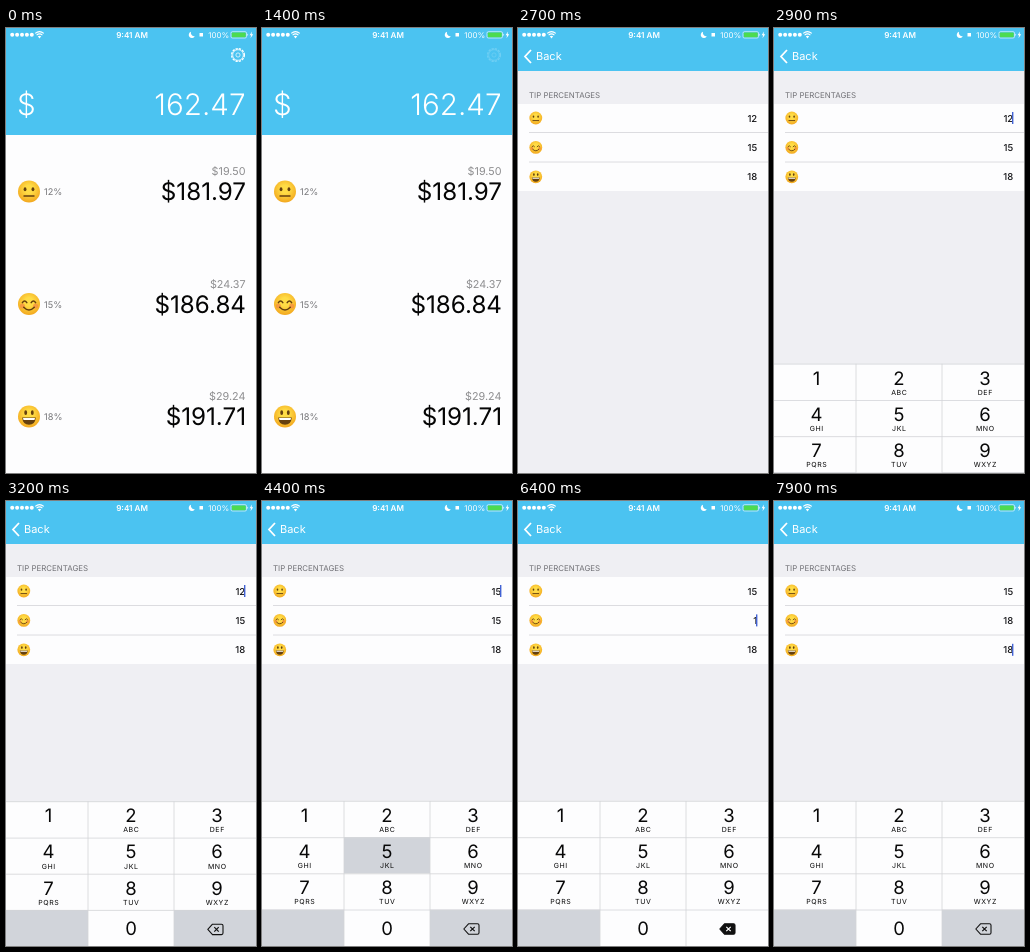
An HTML page for the animation above (8000 ms loop, 250 by 445 pixels).

```html
<!DOCTYPE html>
<html lang="en">
<head>
<meta charset="utf-8">
<title>Tip calculator</title>
<style>
  html, body { margin: 0; width: 100%; height: 100%; overflow: hidden; background: #fdfdfe; }
  svg { display: block; width: 100vw; height: 100vh; }
  text { font-family: Inter, "Open Sans", sans-serif; text-rendering: geometricPrecision; }
  .end { text-anchor: end; }
  .mid { text-anchor: middle; }
  .bill { font-size: 29.6px; font-weight: 300; fill: #fff; }
  .total { font-size: 24.2px; fill: #050505; }
  .tip { font-size: 10.8px; fill: #8e8e90; }
  .rate { font-size: 9.2px; fill: #77777a; }
  .value { font-size: 9.5px; font-weight: 500; fill: #151518; }
  .digit { font-size: 18.5px; fill: #080808; }
  .letters { font-size: 7px; letter-spacing: .6px; fill: #080808; }
</style>
</head>
<body>
<svg viewBox="0 0 250 445" preserveAspectRatio="none">
  <defs>
    <radialGradient id="skin" cx=".5" cy=".4" r=".62">
      <stop offset=".3" stop-color="#ffdc45"/>
      <stop offset="1" stop-color="#f2a51d"/>
    </radialGradient>
    <g id="face0">
      <circle r="10" fill="url(#skin)"/>
      <g fill="#65400f"><ellipse cx="-3.6" cy="-2" rx="1.3" ry="1.8"/><ellipse cx="3.6" cy="-2" rx="1.3" ry="1.8"/></g>
      <path d="M-4.5 4H4.5" stroke="#65400f" stroke-width="1.4" stroke-linecap="round"/>
    </g>
    <g id="face1">
      <circle r="10" fill="url(#skin)"/>
      <g fill="#f58a45" opacity=".7"><circle cx="-6" cy="1.8" r="2.3"/><circle cx="6" cy="1.8" r="2.3"/></g>
      <path d="M-6-1.2Q-4-4.4-2-1.2M2-1.2Q4-4.4 6-1.2M-4.8 3Q0 8 4.8 3" fill="none" stroke="#65400f" stroke-width="1.4" stroke-linecap="round"/>
    </g>
    <g id="face2">
      <circle r="10" fill="url(#skin)"/>
      <g fill="#65400f"><ellipse cx="-3" cy="-3.5" rx="1.3" ry="2.1"/><ellipse cx="3" cy="-3.5" rx="1.3" ry="2.1"/><path d="M-6.2 1H6.2Q5.6 7.6 0 7.6T-6.2 1"/></g>
      <path d="M-5.5 1.3H5.5L5 3.2H-5Z" fill="#fff"/>
    </g>
  </defs>

  <g id="home">
    <rect width="250" height="445" fill="#fdfdfe"/>
    <rect width="250" height="107" fill="#4bc3f1"/>
    <text class="bill" x="11" y="87">$</text>
    <text class="bill end" x="239.5" y="87">162.47</text>
    <g id="totals"></g>
    <rect id="dim" width="250" height="445"/>
  </g>

  <g id="settings">
    <rect width="250" height="445" fill="#efeff3"/>
    <text x="11" y="70" font-size="7.9" fill="#707075">TIP PERCENTAGES</text>
    <rect y="76" width="250" height="87" fill="#fdfdfe"/>
    <path d="M11 104.5H250M11 134H250" stroke="#dcdce0"/>
    <g id="fields"></g>
    <rect id="caret" x="238" width="1.4" height="12" fill="#4262d4"/>
  </g>

  <g id="keypad"></g>

  <g id="navbar">
    <rect width="250" height="43" fill="#4bc3f1"/>
    <g id="gear" fill="none" stroke="#fff" transform="translate(232 27)">
      <circle r="6.3" stroke-width="1.5" stroke-dasharray="2.3 1"/>
      <circle r="5.3" stroke-width=".7"/>
      <circle r="2.1" stroke-width=".7"/>
    </g>
    <g id="return">
      <path d="M13 22L7 28.5L13 35" fill="none" stroke="#fff" stroke-width="1.8"/>
      <text x="18" y="32" font-size="11" fill="#fff">Back</text>
    </g>
  </g>

  <g fill="#fff">
    <g id="signal"></g>
    <path d="M33.5 10.5L31.8 8.3Q33.5 7 35.2 8.3Z"/>
    <path d="M30.6 7.1Q33.5 4.7 36.4 7.1M29.2 5.4Q33.5 1.8 37.8 5.4" fill="none" stroke="#fff" stroke-width="1.1"/>
    <text class="mid" x="126" y="9.8" font-size="8.1" font-weight="600">9:41 AM</text>
    <path d="M185 3.8A3.2 3.2 0 1 0 188.8 8.3A3.5 3.5 0 0 1 185 3.8Z"/>
    <rect x="193.5" y="5" width="3.5" height="3.5"/>
    <text x="202.3" y="9.8" font-size="7.9">100%</text>
    <rect x="225" y="3.7" width="15.5" height="6.3" rx="1.4" fill="none" stroke="#fff" stroke-width=".6"/>
    <rect x="225.8" y="4.5" width="13.9" height="4.7" rx=".8" fill="#4cdb50"/>
    <path d="M241.4 5.5Q243 6.8 241.4 8.1Z"/>
    <path d="M246 3.5L243.6 7.2H245.1L244.5 10.3L247.2 6.3H245.6Z"/>
  </g>
</svg>

<script>
const $ = id => document.getElementById(id);
const set = (id, name, value) => $(id).setAttribute(name, value);
const clamp = v => Math.max(0, Math.min(1, v));
const ramp = (t, from, to) => clamp((t - from) / (to - from));
const face = (i, x, y, r) => `<use href="#face${i}" transform="translate(${x} ${y}) scale(${r / 10})"/>`;

// Critically damped spring from 0 to 1
function spring(t, start, rate) {
  const k = Math.max(0, t - start) / 1000 * rate;
  return 1 - (1 + k) * Math.exp(-k);
}

$('signal').innerHTML = [0, 1, 2, 3, 4].map(i => `<circle cx="${6.2 + i * 4.9}" cy="6.8" r="2"/>`).join('');

$('totals').innerHTML = [
  ['12%', '$19.50', '$181.97'],
  ['15%', '$24.37', '$186.84'],
  ['18%', '$29.24', '$191.71']
].map(([rate, tip, total], i) => `<g transform="translate(0 ${i * 112.5})">
  ${face(i, 23, 163.5, 11)}
  <text class="rate" x="38" y="167">${rate}</text>
  <text class="tip end" x="239.5" y="147">${tip}</text>
  <text class="total end" x="240" y="172.3">${total}</text></g>`).join('');

const rowY = i => 90 + i * 29.4;
$('fields').innerHTML = [0, 1, 2].map(i => face(i, 17.8, rowY(i), 6.4) +
  `<text class="value end" id="value${i}" x="239.2" y="${rowY(i) + 3.5}"></text>`).join('');

// Keypad: 3 columns by 4 rows, blank bottom left and delete bottom right
const WHITE = '#fdfdfe', GRAY = '#d1d4da';
const edges = [0, 82, 168, 250], centers = [42.5, 125, 211];
const letters = ['', 'ABC', 'DEF', 'GHI', 'JKL', 'MNO', 'PQRS', 'TUV', 'WXYZ'];
let keys = `<rect y="300" width="250" height="146" fill="${GRAY}"/>`;
for (let i = 0; i < 12; i++) {
  const col = i % 3, row = (i - col) / 3, top = 300 + row * 36.2, cx = centers[col];
  const name = i < 9 ? i + 1 : ['blank', 0, 'delete'][col];
  const typed = i !== 9 && i !== 11;
  keys += `<rect id="key-${name}" x="${edges[col]}" y="${top}" width="${edges[col + 1] - edges[col]}" height="37" fill="${typed ? WHITE : GRAY}"/>`;
  if (typed) {
    keys += `<text class="digit mid" x="${cx}" y="${top + (i === 10 ? 25 : 20.8)}">${name}</text>`;
    keys += `<text class="letters mid" x="${cx + .3}" y="${top + 31}">${letters[i] || ''}</text>`;
  }
}
keys += `<path d="M0 300.3H250M0 336.7H250M0 372.8H250M0 409H250M82 300V445M168 300V445" stroke="#d4d5d9" stroke-width=".8"/>
  <path id="back" d="M201.8 428L206.5 422.8H215.5Q217 422.8 217 424.3V431.7Q217 433.2 215.5 433.2H206.5Z" stroke="#111" stroke-width="1.1" stroke-linejoin="round"/>
  <path id="cross" d="M208.3 425.8L212.7 430.2M212.7 425.8L208.3 430.2" stroke-width="1.2"/>`;
$('keypad').innerHTML = keys;

// Times of the taps and edits, in ms
const GEAR = 1400, PUSH = 1500, FOCUS = [2750, 5200, 7600];
const DELETE = [3850, 6350], TYPE = [4350, 6900];
const edits = [...FOCUS, ...DELETE, ...TYPE].sort((a, b) => a - b);

// The caret stays solid after each edit, then blinks
function caretAlpha(t) {
  const last = edits.filter(e => e <= t).pop();
  if (last === undefined) return 0;
  const u = (t - last) % 1000;
  return u < 800 ? 1 - ramp(u, 550, 700) : ramp(u, 900, 1000);
}

const edited = (t, i, before, after) => t < DELETE[i] ? before : t < TYPE[i] ? '1' : after;
const held = (t, down, length) => t >= down && t < down + length;

function draw(t) {
  const push = spring(t, PUSH, 14);
  set('gear', 'opacity', (t < GEAR ? 1 : .2) * (1 - push));
  set('return', 'opacity', push);
  set('home', 'transform', `translate(${-75 * push})`);
  set('dim', 'opacity', .1 * push);
  set('settings', 'transform', `translate(${250 * (1 - push)})`);
  set('keypad', 'transform', `translate(0 ${146 * (1 - spring(t, FOCUS[0], 18))})`);

  [edited(t, 0, '12', '15'), edited(t, 1, '15', '18'), '18']
    .forEach((v, i) => { $('value' + i).textContent = v; });
  const active = t < FOCUS[1] ? 0 : t < FOCUS[2] ? 1 : 2;
  set('caret', 'y', rowY(active) - 6);
  set('caret', 'opacity', caretAlpha(t));

  ['key-5', 'key-8'].forEach((key, i) => set(key, 'fill', held(t, TYPE[i] - 50, 180) ? GRAY : WHITE));
  const deleting = DELETE.some(d => held(t, d, 150));
  set('key-delete', 'fill', deleting ? WHITE : GRAY);
  set('back', 'fill', deleting ? '#111' : 'none');
  set('cross', 'stroke', deleting ? '#fff' : '#111');
}

const start = performance.now();
function tick() {
  draw((performance.now() - start) % 8000);
  requestAnimationFrame(tick);
}
tick();
</script>
</body>
</html>
```
